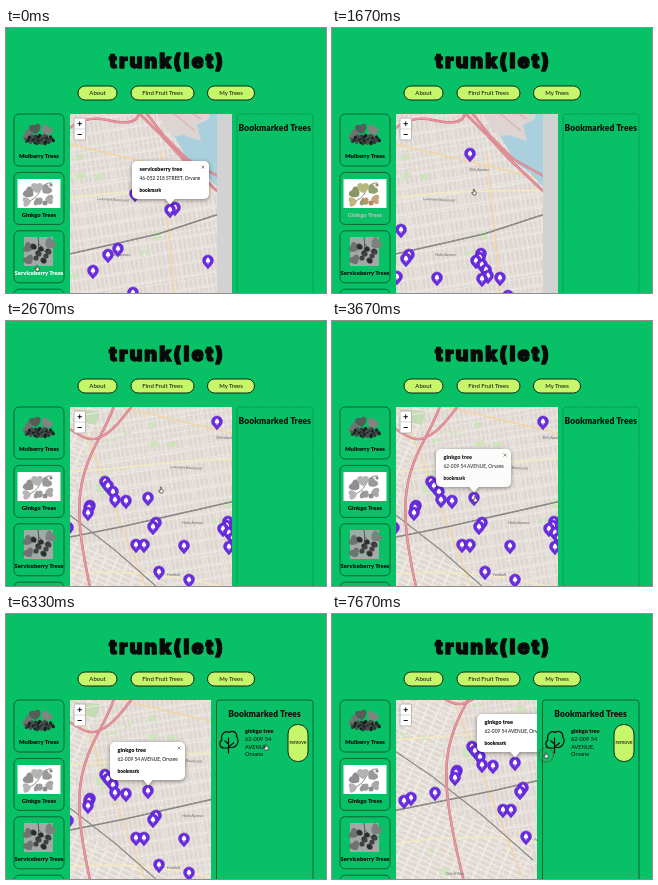
Write an HTML page that moves like this. It is 320 by 265 pixels and loops after 8 s.

```html
<!DOCTYPE html>
<html lang="en">
<head>
<meta charset="utf-8">
<title>Tree finder</title>
<style>
html, body { margin: 0; width: 100%; height: 100%; overflow: hidden; background: #08c167; }
svg { display: block; }
#stage { position: absolute; left: 0; top: 0; width: 320px; height: 265px; }
text { font-family: Lato, "Open Sans", sans-serif; fill: #0a0a0a; }
.b { font-weight: 900; }
.m { text-anchor: middle; }
.logo { font: 900 20px Inter, "DejaVu Sans", sans-serif; letter-spacing: 1.9px; stroke: #0a0a0a; stroke-width: 1.3; stroke-linejoin: round; }
.head { font-size: 8.4px; letter-spacing: .14px; }
.pill { fill: #c6f66a; stroke: #0b2a14; stroke-width: 1; }
.frame { fill: none; stroke: #045a30; stroke-width: .9; }
.panel { fill: none; stroke: #067a43; stroke-width: .8; stroke-dasharray: 1 .8; }
.label { font-size: 3.6px; fill: #666; }
.popup { filter: drop-shadow(0 1px 2px rgba(0,0,0,.45)); }
.road { fill: none; stroke-linecap: round; stroke-linejoin: round; }
</style>
</head>
<body>
<svg id="stage" viewBox="0 0 320 265">
  <defs>
    <pattern id="blocks" width="4.6" height="13" patternUnits="userSpaceOnUse" patternTransform="rotate(-9)">
      <path d="M0 0H5V13H0Z" fill="#e6dfd9"/>
      <path d="M1.7 2h.8v9h-.8ZM3.3 2h.6v9h-.6Z" fill="#d8cfc8"/>
      <path d="M0 0V13M0 0H5" stroke="#f6f3f0" stroke-width="1.4"/>
      <path d="M.8 1V13M1 .9H5" stroke="#cbc3be" stroke-width=".3"/>
    </pattern>
    <pattern id="blocks2" width="11" height="5" patternUnits="userSpaceOnUse" patternTransform="rotate(24)">
      <path d="M0 0H11V5H0Z" fill="#e6dfd9"/>
      <path d="M2 1.8h8v.8H2ZM2 3.6h8v.6H2Z" fill="#d8cfc8"/>
      <path d="M0 0V5M0 0H11" stroke="#f6f3f0" stroke-width="1.4"/>
    </pattern>
    <g id="pin">
      <path d="M0 8C-2 5-5.5 3-5.5-.6A5.5 5.5 0 0 1 5.5-.6C5.5 3 2 5 0 8Z" fill="#6a2ce0" stroke="#4d1bb5" stroke-width=".4"/>
      <path d="M0-3.6C1.3-2.6 2.3-.9 2.2.2 2.1 1.3 1.3 1.6.4 1.6V3.2H-.4V1.6C-1.3 1.6-2.1 1.3-2.2.2-2.3-.9-1.3-2.6 0-3.6Z" fill="#fff"/>
    </g>
  </defs>

  <rect width="320" height="265" fill="#08c167"/>
  <text class="logo m" x="161" y="39.5">trunk(let)</text>
  <g id="nav"></g>
  <g id="cards"></g>

  <svg x="64" y="86" width="162" height="179" viewBox="64 86 162 179">
    <g id="world">
      <rect x="0" y="30" width="330" height="290" fill="url(#blocks)"/>
      <path d="M0 30H112L84 118 70 160 60 320H0Z" fill="url(#blocks2)"/>
      <path d="M60 214L160 258 150 320H50Z" fill="url(#blocks2)"/>
      <g id="parks" fill="#cfe3bd"></g>
      <path d="M68 88L94 90 90 104 72 100Z" fill="#c3dcb4"/>
      <g id="streets" class="road"></g>
      <g class="road">
        <path d="M60 73L119 87 225 112 330 138M60 61L150 293M228 100L246 293" stroke="#f2d6a4" stroke-width="1.5"/>
        <path d="M0 155Q90 150 150 143T330 138M0 262Q100 240 200 262T330 250" stroke="#f4eac0" stroke-width="1.5"/>
      </g>
      <path d="M222 30H330V152L290 140 270 119 257 110 243 86 232 74Z" fill="#a9d0dc"/>
      <path d="M222 30H282L276 66 264 72 268 88 250 82 240 84 230 72Z" fill="#ddd5d2"/>
      <path d="M238 58L262 78M246 52L268 66" stroke="#d9b3b5" stroke-width="1.2"/>
      <g class="road">
        <path d="M0 229L64 216 119 205 225 181 280 163 330 150" stroke="#777" stroke-width="1.6"/>
        <path d="M0 229L64 216 119 205 225 181 280 163 330 150" stroke="#b9b5b2" stroke-width=".5" stroke-dasharray="3 2"/>
        <path d="M0 150L60 191 110 230 160 274" stroke="#8b8886" stroke-width="1.1"/>
        <g id="highways"></g>
      </g>
      <text class="label" x="164" y="147" transform="rotate(3 164 147)">Larkmoor Boulevard</text>
      <text class="label" x="161" y="255">Fernholt</text>
      <text class="label" x="73" y="289">Oakrill Park</text>
      <text class="label" x="210" y="118">35th Avenue</text>
      <text class="label" x="176" y="203">Holm Avenue</text>
      <g id="ginkgo"></g>
      <g id="service"></g>
      <g id="popA" class="popup"></g>
      <g id="popB" class="popup"></g>
    </g>
    <rect id="void" x="211" y="86" width="15" height="179" fill="#d3d2d2"/>
    <rect x="68" y="90" width="11.5" height="22" rx="1.5" fill="#fff" stroke="#a9a6a3" stroke-width=".8"/>
    <path d="M68 101h11.5" stroke="#bbb" stroke-width=".6"/>
    <path d="M71.5 95.7h4.4M73.7 93.5v4.4M71.6 106.5h4.2" stroke="#111" stroke-width="1"/>
  </svg>

  <g id="before">
    <rect class="panel" x="231" y="86" width="76" height="190" rx="3"/>
    <text class="b m head" x="268.8" y="103.3">Bookmarked Trees</text>
  </g>
  <g id="after">
    <rect x="205" y="84" width="115" height="181" fill="#08c167"/>
    <rect class="frame" x="210.5" y="86" width="96.5" height="190" rx="3"/>
    <text class="b m head" x="258.6" y="103.3">Bookmarked Trees</text>
    <path d="M222.5 139V124M222.5 133L227.5 129M222.5 130L219 127M222.5 134H218C213.5 134 212.5 128 216 126 214 121 219 116 223 118.5 227 115.5 231.5 119 230.5 122.5 234 127 231 133 226 133.5H222.5" fill="none" stroke="#0a0a0a" stroke-width="1.2" stroke-linecap="round" stroke-linejoin="round"/>
    <g font-size="5.6">
      <text class="b" x="239" y="119.3">ginkgo tree</text>
      <text x="239" y="127">62-009 54</text>
      <text x="239" y="134.5">AVENUE,</text>
      <text x="239" y="142">Orvane</text>
    </g>
    <rect class="pill" x="282" y="110.5" width="20" height="37" rx="9.5"/>
    <text class="m" x="292" y="130.3" font-size="5.2">remove</text>
  </g>

  <g id="cursor">
    <circle id="ring" r="10.8" fill="none" stroke="#333" stroke-width=".8"/>
    <circle id="ring2" r="7.3" fill="none" stroke="#8a2a2a" stroke-width=".9" stroke-dasharray="2 1"/>
    <path d="M-.7-2.6Q0-3.4.6-2.6V-.6L2.2 0Q2.6 1.6 1.6 3H-1L-2.3.6-.7.8Z" fill="#fff" stroke="#111" stroke-width=".6"/>
  </g>
</svg>
<script>
const $ = id => document.getElementById(id);
const add = (id, html) => { $(id).innerHTML += html; };
const LOOP = 8000;

// nav pills: left, width, caption
[[72, 39, 'About'], [125, 63, 'Find Fruit Trees'], [201.5, 47, 'My Trees']].forEach(([x, w, s]) =>
  add('nav', `<rect class="pill" x="${x}" y="58" width="${w}" height="14" rx="7"/>
    <text class="m" x="${x + w / 2}" y="67.1" font-size="6">${s}</text>`));

// tree cards
const dot = (x, y, r, c) => `<circle cx="${x}" cy="${y}" r="${r}" fill="${c}"/>`;
const leaf = (x, y, a, s, c) =>
  `<path transform="translate(${x} ${y}) rotate(${a}) scale(${s})" d="M0 0C-4-2-6-5-5-8Q-2-10 0-8 2-10 5-8C6-5 4-2 0 0Z" fill="${c}"/>`;
let berries = leaf(27, 110, -60, 1.1, '#6c756f') + leaf(30, 106, -10, 1.1, '#555d58') + leaf(38, 107, 30, 1.1, '#7d8780');
for (let i = 0; i < 46; i++) {
  const a = i * 2.4, r = Math.sqrt(i / 46);
  berries += dot(33.5 + 15 * r * Math.cos(a), 111.5 + 4.6 * r * Math.sin(a), 1.6, ['#1c1c1e', '#333336', '#4d4d50'][i % 3]);
}
const fans = '<rect x="11.5" y="151" width="43" height="29" fill="#fff"/>' +
  '<path d="M18 175Q30 172 34 163T46 155M30 170L40 176" fill="none" stroke="#8a6b3a" stroke-width=".8"/>' +
  leaf(27, 168, -50, 1.1, '#7f9d35') + leaf(31, 165, 0, 1.1, '#b9bd45') + leaf(37, 165, 45, 1, '#86a843') +
  leaf(25, 173, -100, .9, '#cfb84a') + leaf(39, 171, 95, .9, '#e0a14f') + leaf(31, 170, 170, .8, '#8ba53f') +
  dot(34, 172, 2.6, '#e58f3a') + dot(39, 175, 2.5, '#dd7d33') + dot(45, 157, 1.6, '#d9773a');
let sprig = '<rect x="18" y="209" width="29" height="29" fill="#a4a9a6"/>' +
  leaf(26, 222, -60, 1, '#6d7370') + leaf(40, 219, 50, 1.1, '#7b817d') + leaf(25, 236, -30, 1, '#6d7370') +
  '<path d="M32 209Q34 218 30 232M33 216L41 226" fill="none" stroke="#444" stroke-width=".8"/>';
for (let i = 0; i < 11; i++)
  sprig += dot(27 + i * 5 % 17, 218 + i * 7 % 16, 2.6, i % 2 ? '#2c2c2e' : '#414144');

['Mulberry', 'Ginkgo', 'Serviceberry', 'Apple'].forEach((name, i) => {
  const y = 86 + 58.4 * i;
  add('cards', `<rect class="frame" x="8" y="${y}" width="50" height="52" rx="5"/>
    <g id="pic${i}">${[berries, fans, sprig, ''][i]}</g>
    <text id="name${i}" class="b m" x="33" y="${y + 44.2}" font-size="5.9">${name} Trees</text>`);
});

// minor streets and parks, seeded
let seed = 7;
const rnd = () => (seed = seed * 16807 % 2147483647) / 2147483647;
let minor = '';
for (let i = 0; i < 17; i++) {
  const x = 10 + i * 19 + rnd() * 8, y = 45 + i * 16 + rnd() * 6;
  minor += `M${x} 40L${x + 42} 310M0 ${y + 26}L330 ${y - 26}`;
}
add('streets', `<path d="${minor}" stroke="#d2cac4" stroke-width="1.1"/><path d="${minor}" stroke="#f8f6f4" stroke-width=".7"/>`);
for (let i = 0; i < 16; i++)
  add('parks', `<rect x="${20 + rnd() * 210}" y="${70 + rnd() * 215}" width="${3 + rnd() * 8}" height="${3 + rnd() * 6}" transform="rotate(-9 150 170)"/>`);

['M116 50C112 90 94 112 84 136S72 180 74 205 82 260 92 300',
 'M40 85Q68 116 84 118T122 90 174 67 206 60L226 80 248 104 284 138 310 160',
 'M210 56L232 84 254 106 290 126 330 140'].forEach(d =>
  add('highways', `<path d="${d}" stroke="#c9707a" stroke-width="2.5"/><path d="${d}" stroke="#e8979e" stroke-width="1.7"/>`));

// markers
const pins = (id, list, dx = 0, dy = 0) => list.split(' ').forEach(p => {
  const [x, y] = p.split(',');
  add(id, `<use href="#pin" x="${+x + dx}" y="${+y + dy}"/>`);
});
pins('ginkgo', '211,101 99,161 102,165 107,171 109,179 84,185 120,180 142,177 83,187 82,192 38,212 31,215 62,207 ' +
  '150,202 147,206 222,201 221,205 217,208 223,212 227,217 229,223 223,226 130,224 138,224 178,225 241,225 249,243 153,251 183,259');
pins('service', '129,166 169,180 164,182 112,221 102,227 202,233 87,243 127,265', 73, -25);

const popup = (id, x, y, w, name, place) => {
  $(id).setAttribute('transform', `translate(${x} ${y})`);
  add(id, `<path d="M-5-11.5L0-5.5 5-11.5Z" fill="#fff"/><rect x="-38" y="-49" width="${w}" height="38" rx="5" fill="#fff"/>
    <text class="b" x="-30.5" y="-38.6" font-size="5.6">${name}</text>
    <text x="-30.5" y="-30" font-size="4.8">${place}</text>
    <text id="${id}Link" class="b" x="-30.5" y="-18.4" font-size="4.7">bookmark</text>
    <path d="M${w - 45.5}-44.5l3 3m0-3l-3 3" stroke="#666" stroke-width=".7"/>`);
};
popup('popA', 237, 157, 77, 'serviceberry tree', '46-052 218 STREET, Orvane');
popup('popB', 142, 177, 75, 'ginkgo tree', '62-009 54 AVENUE, Orvane');

// hard-step keyframes from "ms value" pairs
let css = '';
const steps = (id, prop, list) => {
  const keys = list.map(([t, v]) => `${t / LOOP * 100}%{${prop}:${v}}`).join('');
  css += `@keyframes k-${id}{${keys}100%{${prop}:${list[list.length - 1][1]}}}
    #${id}{animation:k-${id} ${LOOP}ms step-end infinite}`;
};
const move = (id, list) => steps(id, 'transform', list.map(([t, x, y]) => [t, `translate(${x}px,${y}px)`]));
const fade = (id, ...list) => steps(id, 'opacity', list);

move('world', [[0, -73, 25], [2000, -55, 19], [2330, -22, 8], [2670, 0, 0], [7670, 41, -28]]);
move('cursor', [[0, 31, 240], [330, 32, 222], [670, 34, 184], [1000, 38, 178], [1330, 50, 170], [1670, 142, 164], [2000, 160, 163],
  [2330, 193, 152], [2670, 155, 169], [3330, 143, 178], [4670, 128, 160], [6000, 226, 128],
  [6330, 260, 133], [7000, 172, 168], [7330, 150, 181], [7670, 214, 141]]);
fade('ring', [0, 0], [2000, 1], [2330, 0]);
fade('ring2', [0, 0], [7670, 1]);
fade('void', [0, 1], [2000, 0]);
fade('service', [0, 1], [1330, .5], [1670, 0]);
fade('popA', [0, 1], [1330, .5], [1670, 0]);
fade('ginkgo', [0, 0], [1330, .5], [1670, 1]);
fade('popB', [0, 0], [3330, .7], [3670, .9], [4000, 1]);
fade('before', [0, 1], [5330, 0]);
fade('after', [0, 0], [5330, 1]);
steps('popBLink', 'fill', [[0, '#0a0a0a'], [4670, '#06803f'], [5000, '#08c167'], [6000, '#06803f'], [6330, '#0a0a0a']]);
steps('name2', 'fill', [[0, '#fff'], [330, '#bbb'], [670, '#0a0a0a']]);
steps('name1', 'fill', [[0, '#0a0a0a'], [670, '#bbb'], [1000, '#fff'], [1670, '#bbb'], [2000, '#0a0a0a']]);
steps('pic1', 'filter', [[0, 'grayscale(1)'], [670, 'grayscale(.5)'], [1000, 'grayscale(0)'], [1670, 'grayscale(.5)'], [2000, 'grayscale(1)']]);
document.head.appendChild(document.createElement('style')).textContent = css;
</script>
</body>
</html>
```
